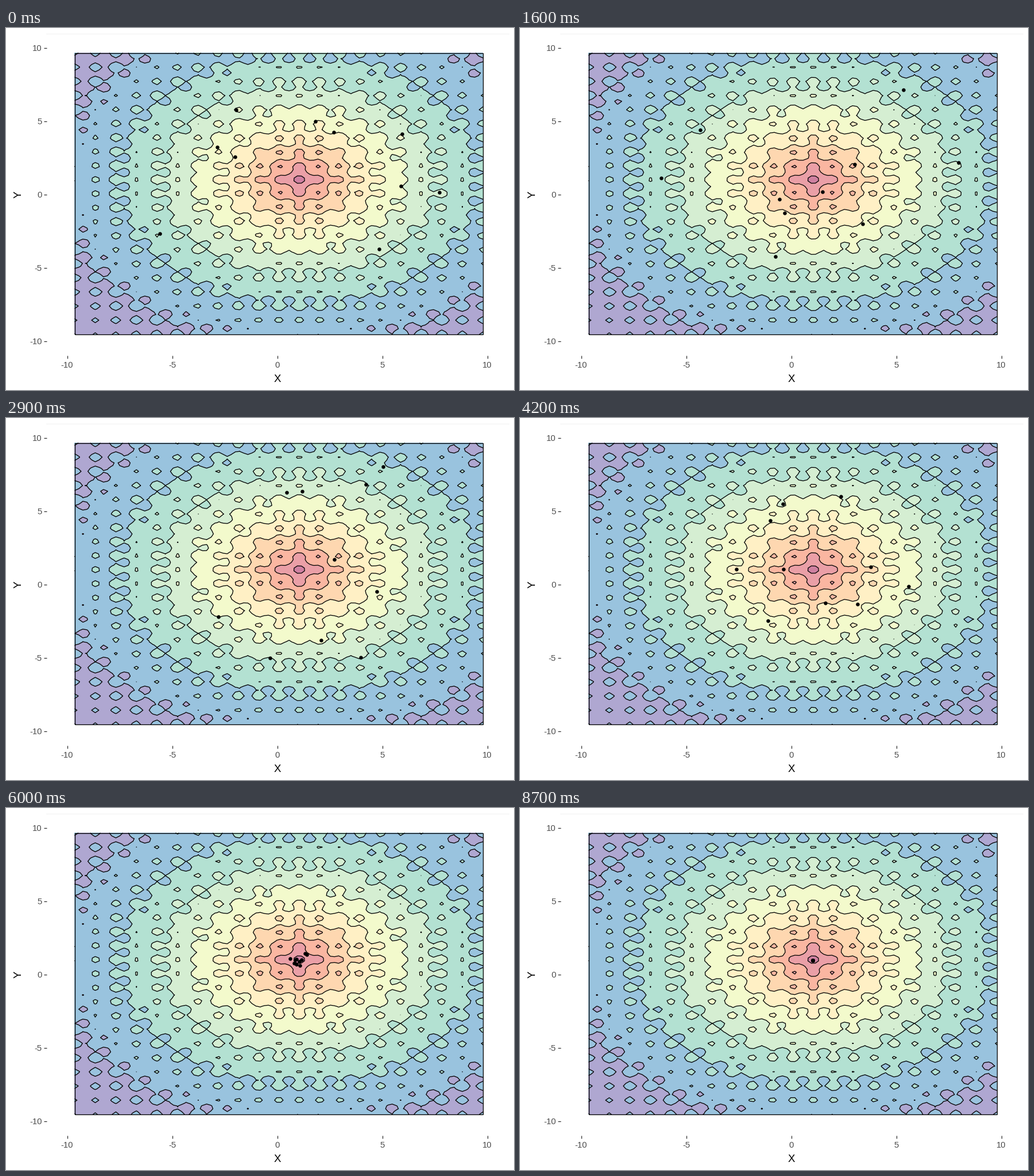
These frames come from a looping animation (885 px wide and 632 px high, 10 s). A matplotlib script:

```python
import numpy as np
import matplotlib.pyplot as plt
from matplotlib.animation import FuncAnimation
from matplotlib.patches import Rectangle

W, H, DPI = 885, 632, 100
PX = 72 / DPI  # points per pixel
FRAMES, STEP = 100, 100
BEST = np.array([510.0, 265.5])

plt.rcParams["font.family"] = "Liberation Sans"
fig = plt.figure(figsize=(W / DPI, H / DPI), dpi=DPI, facecolor="white")
ax = fig.add_axes([0, 0, 1, 1])
ax.set_xlim(0, W)
ax.set_ylim(H, 0)
ax.axis("off")


def ackley(x, y):
    bowl = 20 * np.exp(-0.2 * np.sqrt(0.5 * ((x - 1) ** 2 + (y - 1) ** 2)))
    ripple = np.exp(0.5 * (np.cos(2 * np.pi * x) + np.cos(2 * np.pi * y)))
    return 20 + np.e - bowl - ripple


def tint(color):
    """Blend a hex colour half and half with white."""
    return [(int(color[i:i + 2], 16) / 255 + 1) / 2 for i in (0, 2, 4)]


def draw_surface():
    left, right, top, bottom = 119.5, 831, 43.5, 535
    grid = np.linspace(-10, 10, 100)
    z = ackley(*np.meshgrid(grid, grid))
    px = np.linspace(left, right, grid.size)
    py = np.linspace(bottom, top, grid.size)
    spectral = ("9E0142 D53E4F F46D43 FDAE61 FEE08B "
                "E6F598 ABDDA4 66C2A5 3288BD 5E4FA2").split()
    levels = np.arange(0, 21, 2)
    ax.contourf(px, py, z, levels, colors=[tint(c) for c in spectral],
                antialiased=False)
    ax.contour(px, py, z, levels[1:-1], colors="black",
               linewidths=1.3 * PX, antialiased=True)
    ax.add_patch(Rectangle((left, top), right - left, bottom - top,
                           fill=False, ec="black", lw=1.3 * PX))


def draw_axes():
    label = dict(fontsize=14.93 * PX, color="#4d4d4d", va="baseline")
    tick = dict(color="#333333", lw=1.3 * PX, solid_capstyle="butt")
    for v in range(-10, 11, 5):
        x, y = 472.5 + 36.6 * v, 291 - 25.57 * v
        ax.plot([x, x], [571.5, 576.5], **tick)
        ax.plot([65.5, 70.5], [y, y], **tick)
        ax.text(x, 593, str(v), ha="center", **label)
        ax.text(62.5, y + 5, str(v), ha="right", **label)
    title = dict(fontsize=18.67 * PX, color="black", ha="center")
    ax.text(472.5, 618.5, "X", va="baseline", **title)
    ax.text(22, 290.5, "Y", va="center", rotation=90, **title)
    ax.plot([70, 876], [9.5, 9.5], color="#f0f0f0", lw=PX)


# Each particle swings around the best point, from its start and a random kick.
start = np.array([(400, 142), (538, 162), (570, 181), (689, 184), (367, 207),
                  (398, 224), (687, 275), (754, 286), (267, 358), (649, 385)])
offset = start + 0.5 - BEST
rng = np.random.default_rng(12)
kick = rng.uniform(-1, 1, (10, 2)) * (240, 220)
omega = rng.uniform(0.35, 0.6, (10, 2))
STRAGGLER = 4


def spread(frame):
    """How far the swarm reaches: wide at first, then a quick collapse."""
    return np.interp(frame, [0, 7, 25, 44, 50, 60, 78, 87],
                     [1, 1.1, 0.95, 0.6, 0.16, 0.06, 0.012, 0])


def swarm_at(frame):
    phase = omega * frame
    swing = offset * np.cos(phase) + kick * np.sin(phase)
    pos = BEST + spread(frame) * swing
    # One particle is thrown out to the right, then to the left.
    if 60 < frame < 74:
        beats = [60, 63, 66, 70, 74]
        pos[STRAGGLER, 0] += np.interp(frame, beats, [0, 305, 0, -236, 0])
        pos[STRAGGLER, 1] += np.interp(frame, beats, [0, 198, 0, 232, 0])
    return pos


draw_surface()
draw_axes()
dots, = ax.plot([], [], "o", color="black", ms=6.5 * PX, mew=0, zorder=5)


def update(frame):
    dots.set_data(*swarm_at(frame).T)
    return dots,


anim = FuncAnimation(fig, update, frames=FRAMES, interval=STEP,
                     repeat=True, repeat_delay=0)
plt.show()
```
